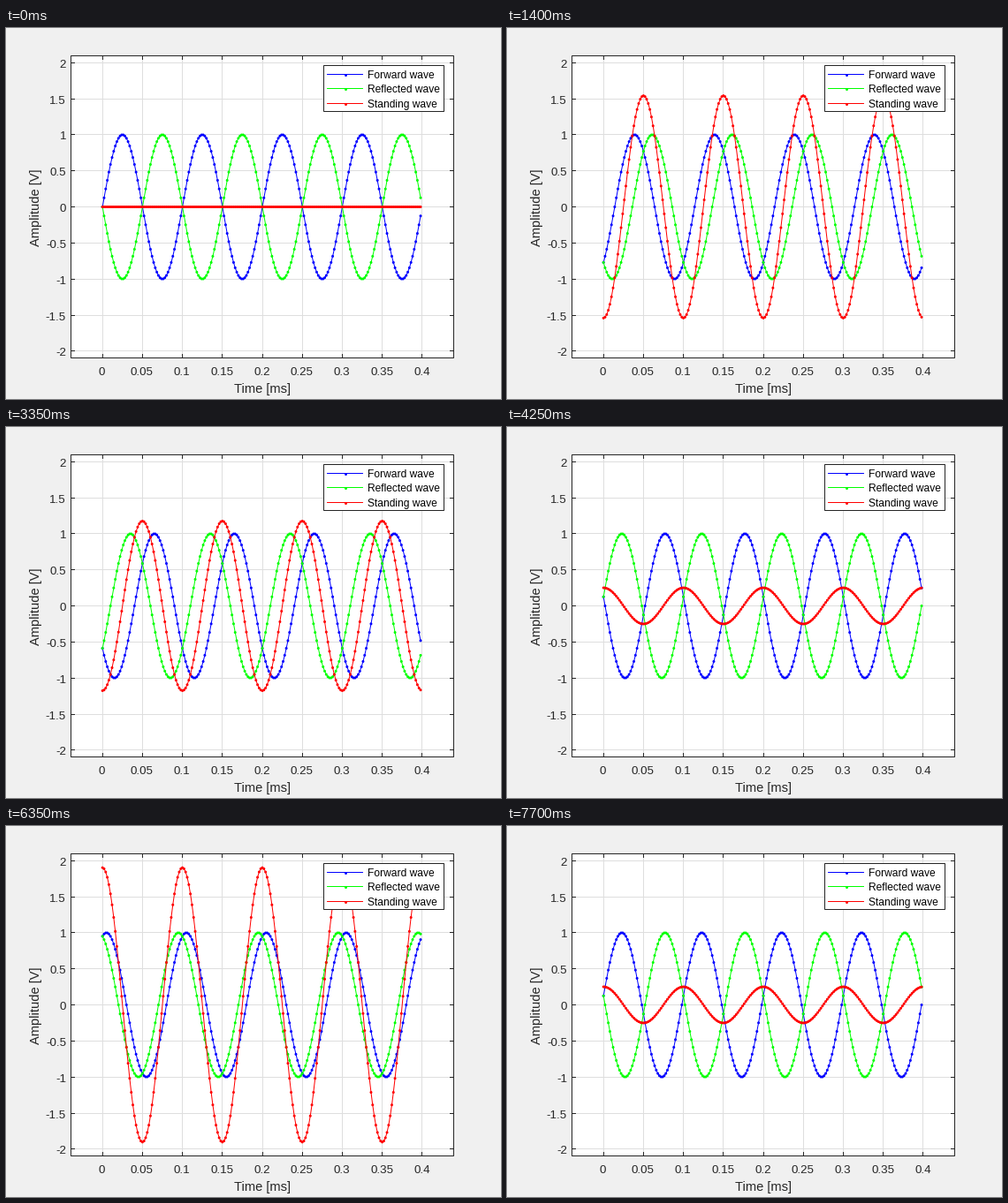
A matplotlib script that plays this animation: 560x420 px, repeating every 7850 ms.

```python
import numpy as np
import matplotlib.pyplot as plt
from matplotlib.animation import FuncAnimation
from matplotlib.patches import Rectangle

W, H, DPI = 560, 420, 100
PX = 72 / DPI                          # points per pixel
LEFT, RIGHT, TOP, BOTTOM = 73, 507, 31, 374
XS = (RIGHT - LEFT) / 0.48             # pixels per ms
YS = (BOTTOM - TOP) / 4.2              # pixels per volt
X0 = LEFT + 0.04 * XS
Y0 = (TOP + BOTTOM) / 2
INK, GRID = "#262626", "#dedede"
FREQ = 10                              # kHz
STEPS = 50                             # phase steps per cycle
TICK_MS, HOLD, TICKS_PER_STEP = 50, 10, 3

plt.rcParams["font.family"] = "Liberation Sans"

fig = plt.figure(figsize=(W / DPI, H / DPI), dpi=DPI, facecolor="#f0f0f0")
ax = fig.add_axes([0, 0, 1, 1])
ax.set(xlim=(0, W), ylim=(H, 0))
ax.set_autoscale_on(False)
ax.axis("off")


def px(t):
    return X0 + XS * t


def py(v):
    return Y0 - YS * v


def mid(p):
    """Centre of the pixel that holds p."""
    return np.floor(p + 0.01) + 0.5


def segment(x1, y1, x2, y2, color, z):
    ax.plot([x1, x2], [y1, y2], color=color, lw=PX, zorder=z,
            solid_capstyle="butt", snap=False)


def label(x, y, text, size, ha="center", color=INK, rotation=0, z=3):
    ax.text(x, y, text, fontsize=size * PX, ha=ha, va="baseline", color=color,
            rotation=rotation, rotation_mode="anchor", zorder=z)


def frame(x1, y1, x2, y2, z, **style):
    """Box whose one-pixel border lies just inside the given edges."""
    ax.add_patch(Rectangle((x1 + 0.5, y1 + 0.5), x2 - x1 - 1, y2 - y1 - 1,
                           lw=PX, zorder=z, joinstyle="miter", snap=False,
                           **style))


def dots(x, y, color, z):
    # One size per dot keeps them at subpixel positions.
    return ax.scatter(x, y, s=np.full(len(x), (3 * PX) ** 2), color=color,
                      linewidths=0, zorder=z)


# Axes box, grid and ticks
frame(LEFT, TOP, RIGHT, BOTTOM, 0, fc="white", ec="none")
frame(LEFT, TOP, RIGHT, BOTTOM, 2, fc="none", ec=INK)

for t in np.arange(9) * 0.05:
    x = mid(px(t))
    segment(x, TOP, x, BOTTOM, GRID, 1)
    segment(x, TOP, x, TOP + 5, INK, 2)
    segment(x, BOTTOM - 5, x, BOTTOM, INK, 2)
    label(px(t) - 0.5, 393, f"{t:.2g}", 13.33)

for v in np.arange(-4, 5) / 2:
    y = mid(py(v))
    segment(LEFT, y, RIGHT, y, GRID, 1)
    segment(LEFT, y, LEFT + 5, y, INK, 2)
    segment(RIGHT - 5, y, RIGHT, y, INK, 2)
    label(68, py(v) + 5.6, f"{v:g}", 13.33, ha="right")

label(290, 413, "Time [ms]", 14.67)
label(38, 203, "Amplitude [V]", 14.67, rotation=90)

# Waves and legend
WAVES = [("Forward wave", "#0000ff"),
         ("Reflected wave", "#00ff00"),
         ("Standing wave", "#ff0000")]

time = np.arange(200) * 0.002
curves = []
for i, (_, color) in enumerate(WAVES):
    line, = ax.plot(px(time), py(0 * time), color=color, lw=PX, snap=False,
                    zorder=4 + i)
    curves.append((line, dots(px(time), py(0 * time), color, 4 + i)))

frame(359, 42, 496, 95, 8, fc="white", ec=INK)
for i, (name, color) in enumerate(WAVES):
    y = mid(52 + 16.5 * i)
    segment(363, y, 404, y, color, 9)
    dots([383.5], [y], color, 9)
    label(409, y + 4.5, name, 12, ha="left", color="black", z=9)


def update(i):
    step = 0 if i < HOLD else 1 + (i - HOLD) // TICKS_PER_STEP
    phase = 2 * np.pi * step / STEPS
    angle = 2 * np.pi * FREQ * time
    forward = np.sin(angle - phase)
    reflected = -np.sin(angle + phase)
    waves = forward, reflected, forward + reflected
    for (line, points), wave in zip(curves, waves):
        line.set_ydata(py(wave))
        points.set_offsets(np.column_stack([px(time), py(wave)]))


FRAMES = HOLD + TICKS_PER_STEP * (STEPS - 1)
anim = FuncAnimation(fig, update, frames=FRAMES, interval=TICK_MS,
                     repeat=True, repeat_delay=0)
plt.show()
```
